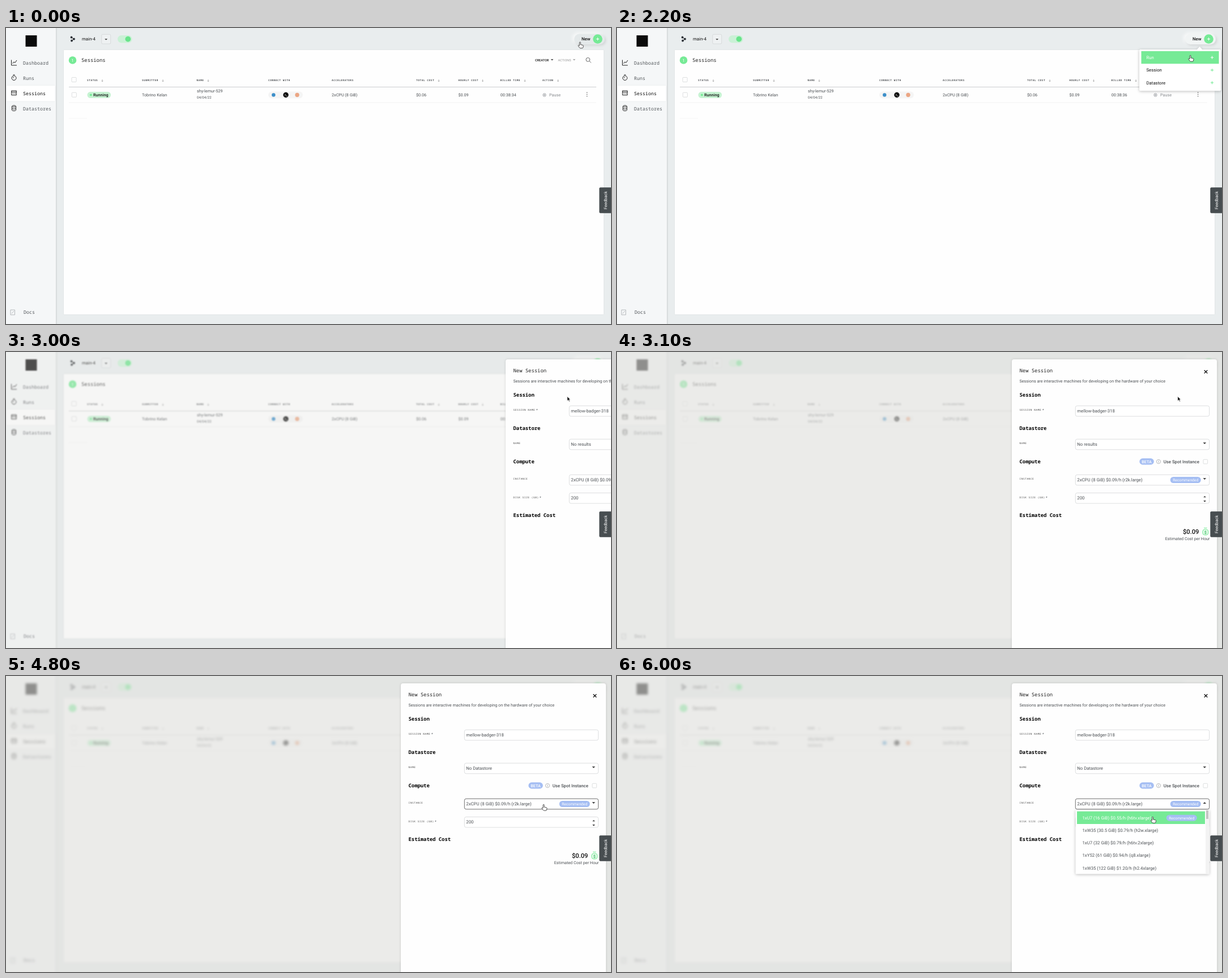
Write an HTML page that moves like this. It is 1068 px wide and 524 px high and loops after 8 s.

```html
<!DOCTYPE html>
<html lang="en">
<head>
<meta charset="utf-8">
<title>New session</title>
<style>
  html, body { margin: 0; width: 100%; height: 100%; overflow: hidden; background: #e9edee; }
  svg { display: block; width: 100%; height: 100%; }
  text { font: 7.23px Roboto, sans-serif; fill: #4c5054; white-space: pre; text-rendering: geometricPrecision; }
  .mono { font: 8.9px "Noto Sans Mono", monospace; fill: #222; }
  .nav { font-size: 8.34px; fill: #54585c; }
  .head { font: 700 4.45px "Noto Sans Mono", monospace; letter-spacing: .56px; fill: #4c4f53; }
  .label { font: 4.45px "Noto Sans Mono", monospace; letter-spacing: .56px; fill: #444; }
  .b { font-weight: 700; fill: #000; }
  .m { font-weight: 500; }
  .f14 { font-size: 7.79px; }
  .small { font-size: 6.1px; }
  .badge { font-size: 6.68px; fill: #fff; }
  .white { fill: #fff; }
  .black { fill: #111; }
  .line { fill: none; stroke: #222; stroke-width: 1; }
  .grey { stroke: #a5a9ac; }
  .box { fill: #fff; stroke: #cfd1d3; stroke-width: .7; }
  .shadow { filter: drop-shadow(0 1px 2.5px #0004); }
  #pill { filter: drop-shadow(2px 2px 2px #0000001c) drop-shadow(-3px -2px 3px #ffffffc0); }
</style>
</head>
<body>
<svg id="stage" viewBox="0 0 1068 524" preserveAspectRatio="none"></svg>
<script>
const GREEN = '#76ea96';
const text = (x, y, s, cls = '', more = '') => `<text x="${x}" y="${y}" class="${cls}" ${more}>${s}</text>`;
const rect = (x, y, w, h, fill, r = 0, more = '') =>
  `<rect x="${x}" y="${y}" width="${w}" height="${h}" rx="${r}" ${fill ? `fill="${fill}"` : ''} ${more}/>`;
const box = (x, y, w, h, r = 1, more = '') => rect(x, y, w, h, '', r, `class="box" ${more}`);
const dot = (x, y, r, fill, more = '') => `<circle cx="${x}" cy="${y}" r="${r}" fill="${fill}" ${more}/>`;
const path = (d, cls = 'line', more = '') => `<path d="${d}" class="${cls}" ${more}/>`;
const caret = (x, y, dir = 1, fill = '#333', w = 2.8) =>
  path(`M${x - w} ${y}h${2 * w}l${-w} ${w * dir}z`, '', `fill="${fill}"`);
const plus = (x, y, color) => path(`M${x - 2.6} ${y}h5.2m-2.6-2.6v5.2`, 'line', `style="stroke:${color}"`);
const group = (id, body, more = '') => `<g id="${id}" ${more}>${body}</g>`;
const recommended = (x, y) => rect(x, y, 54, 11, '#a5bef3', 5.5) + text(x + 27, y + 7.9, 'Recommended', 'badge', 'text-anchor="middle"');

function sidebar() {
  const icons = [
    'M9.5 56.5v9.5h9.5M11.5 63l2.5-3 2 1.5 3-4.5',
    'M14 84.5a4 4 0 1 0 .1 0M12.5 82.8h3M14 88.5l-2-1.5',
    'M9.7 111h8.6v7.8h-8.6zM9.7 113.4h8.6M11.5 116h2M15 116h2',
    'M10.5 138.5a3.5 1.4 0 1 0 7 0a3.5 1.4 0 1 0-7 0v6.8a3.5 1.4 0 0 0 7 0v-6.8M10.5 142a3.5 1.4 0 0 0 7 0'
  ];
  return rect(-20, -20, 108, 564, '#f5f7f8', 0, 'style="filter:drop-shadow(1px 0 1px #0002)"') +
    rect(34.5, 13, 20, 20, '#0b0b0b') +
    rect(1, 102, 85.5, 27.5, '#fff', 1, 'style="filter:drop-shadow(0 0 1px #0001)"') +
    ['Dashboard', 'Runs', 'Sessions', 'Datastores'].map((s, i) =>
      text(30, 65.2 + i * 26.8, s, 'mono nav', i === 2 ? 'style="fill:#111"' : '') + path(icons[i])).join('') +
    path('M8 499h7.5v8.8h-7.5zM10 505.500l4-4.500', 'line grey', 'style="stroke-width:.8"') +
    text(31, 506.4, 'Docs', 'mono nav');
}

function table() {
  const heads = [[143, 'STATUS', 170], [240, 'SUBMITTER', 277], [336.5, 'NAME', 357], [463, 'CONNECT WITH'],
    [575, 'ACCELERATORS'], [724, 'TOTAL COST', 764], [798.5, 'HOURLY COST', 841.5], [872.5, 'BILLED TIME', 916],
    [947, 'ACTION', 974.5]];
  const arrow = x => path(`M${x} 91.200v3.600m-1.200-1.200l1.200 1.200l1.200-1.200`, 'line', 'style="stroke:#777;stroke-width:.6"');
  return rect(102, 39, 953, 468, '#fefefe', 1, 'style="filter:drop-shadow(0 0 1px #0001)"') +
    dot(117.5, 57, 6.8, GREEN) + text(117.5, 59.6, '1', 'white', 'text-anchor="middle"') +
    text(133, 60.2, 'Sessions', 'mono') +
    text(934, 58.5, 'CREATOR', 'black m', 'style="font-size:5.56px"') + caret(964, 55.3, 1, '#333', 2.3) +
    text(974.5, 58.5, 'ACTIONS', '', 'style="font-size:5.56px;fill:#999"') + caret(1003, 55.3, 1, '#999', 2.3) +
    path('M1030.7 56a3.400 3.400 0 1 0-6.800 0a3.400 3.400 0 1 0 6.800 0M1029.800 58.500l3 3', 'line', 'style="stroke:#555;stroke-width:.9"') +
    box(116, 87.5, 8, 8) + box(116.3, 114.3, 8, 8) +
    heads.map(([x, s, a]) => text(x, 93.7, s, 'head') + (a ? arrow(a) : '')).join('') +
    rect(111, 104, 931, .8, '#bfc1c3') + rect(111, 131.7, 931, .7, '#ececec') + rect(111, 159.7, 32, .7, '#efefef') +
    rect(143.5, 113, 41.5, 11, '#c6f3d2', 5.5) + dot(149.8, 118.6, 2, GREEN) + text(154, 121.2, 'Running', 'black m') +
    text(240, 120.7, 'Tobrino Kelan') + text(337, 114, 'shy-lemur-529') + text(337, 124.7, '04/04/22', 'small') +
    rect(463, 112.5, 61, 12, '#f5f5f5', 6) + dot(472.3, 118.5, 3.2, '#3d8fc9') +
    dot(494, 118.5, 4.7, '#0c0c0c') + path('M492 116.800l1.700 1.500l-1.700 1.500M494.300 120.300h2', 'line', 'style="stroke:#fff;stroke-width:.7"') +
    dot(514, 118.5, 3.7, '#eba684') +
    text(575, 120.7, '2xCPU (8 GiB)') + text(724, 120.7, '$0.06') + text(798.5, 120.7, '$0.09') +
    text(872.8, 120.7, '', '', 'id="timer"') +
    dot(950.5, 118.6, 2.7, 'none', 'stroke="#8a8d92" stroke-width=".8"') + rect(949.5, 117.6, 2, 2, '#8a8d92') +
    text(959, 121.2, 'Pause', '', 'style="fill:#85888c"') +
    [114.3, 117.5, 120.7].map(y => dot(1025.6, y, .8, '#555')).join('');
}

function topbar() {
  return [[115.5, 16.5], [116, 22.5], [120, 19.5]].map(([x, y]) => dot(x, y, 1.9, '#30363d')).join('') +
    path('M115.500 16.500L120 19.500L116 22.500') +
    text(134, 22.3, 'main-4', 'f14 black') +
    box(168.7, 11.3, 16, 16.7, 2, 'style="fill:#eef1f2"') + caret(176.6, 19, 1, '#444', 2.5) +
    rect(197, 13, 25.5, 13.3, '#caf1d6', 6.6) + dot(215.3, 19.6, 4.9, '#69e48b') +
    rect(1003, 10.5, 54, 18.5, '', 9.2, 'id="pill"') +
    text(1016, 22.3, 'New', 'black m', 'style="font-size:7.79px"') +
    dot(1044.5, 19.5, 8.3, GREEN) + plus(1044.5, 19.5, '#fff');
}

const menu = () => group('menu',
  `<g class="shadow">${path('M1023 39l5.500-6l5.500 6z', '', 'fill="#fff"')}${rect(922, 38, 144, 73.3, '#fff', 2)}</g>` +
  ['Run', 'Session', 'Datastore'].map((s, i) => {
    const y = 41 + 22.3 * i;
    return `<g class="item">${rect(925.5, y, 137, 22.3, GREEN)}${text(934.5, y + 14, s, 'f14')}` +
      path(`M1047.900 ${y + 11.2}h5.200m-2.600-2.600v5.200`, 'line') + '</g>';
  }).join(''));

function drawer() {
  const fields = [['mellow-badger-318', 95.3], ['', 154.3], ['2xCPU (8 GiB) $0.09/h (r2k.large)', 217.3], ['200', 249.5]];
  const titles = [['New Session', 36.2], ['Session', 78.6], ['Datastore', 137.6], ['Compute', 196.7], ['Estimated Cost', 291.9]];
  const labels = [['SESSION NAME', 104], ['NAME', 162.8], ['INSTANCE', 225.7], ['DISK SIZE (GB)', 258.6]];
  const options = ['1xU7 (16 GiB) $0.55/h (h6tv.xlarge)', '1xW35 (30.5 GiB) $0.79/h (h2w.xlarge)',
    '1xU7 (32 GiB) $0.79/h (h6tv.2xlarge)', '1xY52 (61 GiB) $0.94/h (q8.xlarge)', '1xW35 (122 GiB) $1.20/h (h2.4xlarge)'];
  return group('drawer',
    rect(697, 13, 362, 530, '#fefefe', 4, 'style="filter:drop-shadow(0 0 2px #0002)"') +
    titles.map(([s, y], i) => text(710.5, y, s, i ? 'mono b' : 'mono')).join('') +
    text(710.5, 53.6, 'Sessions are interactive machines for developing on the hardware of your choice') +
    path('M1036.700 32.200l5.600 5.600m0-5.600l-5.600 5.600', 'line', 'style="stroke:#111;stroke-width:1.3"') +
    labels.map(([s, y]) => text(710.5, y, s, 'label')).join('') +
    text(751, 105, '*', 'small') + text(757, 259.5, '*', 'small') +
    fields.map(([s, y], i) => box(809.3, y, 236.3, 18.5, 3, `id="field${i}"`) +
      text(812.3, y + 11.6, s, 'f14', `id="value${i}"`)).join('') +
    caret(1037.3, 160.3) + group('down', caret(1037.3, 223.3)) + group('up', caret(1037.3, 226, -1)) +
    caret(1037.5, 257.3, -1, '#333', 2.4) + caret(1037.5, 263, 1, '#333', 2.4) +
    recommended(976.7, 221) +
    rect(922.3, 188.3, 25.5, 11.2, '#a5bef3', 5.6) + text(935, 196.5, 'BETA', 'white m', 'text-anchor="middle"') +
    dot(956, 194, 3.6, 'none', 'stroke="#9a9da0" stroke-width=".7"') + rect(955.6, 193.3, .8, 2.6, '#9a9da0') + dot(956, 192.2, .5, '#9a9da0') +
    text(964.7, 196.6, 'Use Spot Instance', 'f14 m') + box(1035, 190.3, 7.6, 7.6) +
    text(999, 321.6, '$0.09', 'black m', 'style="font-size:11.12px"') +
    rect(1033.8, 314, 10, 10, '#e4fbea', 4, `stroke="${GREEN}"`) + path('M1036 311.600h5.600', 'line', `style="stroke:${GREEN}"`) +
    text(1038.8, 321.5, '$', 'm', 'text-anchor="middle" style="fill:#35b95d"') +
    text(967.7, 332.8, 'Estimated Cost per Hour') +
    group('list',
      rect(809.5, 237, 236, 113.5, '#fff', 1, 'class="shadow"') +
      rect(1039, 237, 6.5, 113.5, '#f3f3f3') + rect(1040, 238, 4, 15, '#c4c4c4') +
      rect(812, 239.6, 226, 22.4, GREEN, 0, 'id="hot"') +
      options.map((s, i) => text(821.5, 253.6 + 22.25 * i, s, 'f14', `id="option${i}"`)).join('') +
      recommended(969.7, 245.7)));
}

const hand = 'M-1.200 .8c0-1.200 2-1.200 2 0v3.700l4 .9q1 .3.9 1.400l-.7 3q-.2.900-1 .9h-3.800q-.6 0-1-.6l-2.500-3.300q-.4-.8.4-1.200.8-.2 1.700.8z';
const arrow = 'M0 0v8.200l1.900-1.700 1.400 3 1.500-.7-1.400-2.900h2.500z';

stage.innerHTML =
  group('app', rect(-20, -20, 1108, 564, '#e9edee') + topbar() + table() + sidebar() + menu()) +
  rect(0, 0, 1068, 524, '#e1e1de', 0, 'id="veil"') + drawer() +
  rect(1047.3, 282.3, 24, 45.4, '#474d50', 2) +
  text(0, 0, 'Feedback', 'white', 'text-anchor="middle" transform="translate(1060.700 305) rotate(-90)" style="font-size:7.400px"') +
  path('', '', 'id="cursor" stroke="#fff" stroke-width=".8"');

const el = id => document.getElementById(id);
const show = (id, on) => el(id).style.display = on ? '' : 'none';
const items = [...document.querySelectorAll('.item')];

// Pointer tip: time, x, y
const track = [[0, 1013.5, 25], [100, 1038.5, 19], [200, 1038.5, 19], [300, 1039, 18], [400, 1040, 16.8], [500, 1039.7, 18.5],
  [1900, 1039.7, 18.5], [2000, 1036, 25], [2200, 1012.3, 48.5], [2400, 994, 74], [2500, 990.7, 78.5], [3000, 990.7, 78.5],
  [3100, 989.7, 78.5], [3600, 989.7, 78.5], [3800, 985, 96], [4200, 962, 190], [4400, 951, 223], [4500, 949.3, 227.5],
  [5500, 949.3, 227.5], [5600, 949, 234], [5700, 948, 246], [5800, 947.5, 250.3], [5900, 947.5, 250.3], [6000, 945.8, 249.5], [8000, 945.8, 249.5]];

function pointer(t) {
  const i = track.findIndex(k => k[0] > t);
  const [a, b] = [track[i - 1], track[i]];
  const p = (t - a[0]) / (b[0] - a[0]);
  return [a[1] + (b[1] - a[1]) * p, a[2] + (b[2] - a[2]) * p];
}

function draw(t) {
  const [x, y] = pointer(t);
  const open = t >= 3000;
  const inside = (a, b) => y >= a && y < b;

  const isHand = open ? inside(154, 173) || inside(217, 270) : t < 2900 && !inside(30, 36);
  const cursor = el('cursor');
  cursor.setAttribute('d', isHand ? hand : arrow);
  cursor.setAttribute('fill', isHand ? '#fff' : '#111');
  cursor.setAttribute('stroke', isHand ? '#222' : '#fff');
  cursor.setAttribute('transform', `translate(${x} ${y})`);

  const tick = t < 400 ? 34 : t < 1500 ? 35 : 36 + Math.floor((t - 1400) / 1000);
  el('timer').textContent = '00:38:' + tick;
  el('pill').setAttribute('fill', !open && y < 30 ? '#e4e9ea' : '#f1f4f4');

  show('menu', t >= 1400 && t < 3100);
  const part = t < 1500;
  el('menu').setAttribute('opacity', part ? .38 : open ? .4 : 1);
  el('menu').setAttribute('transform', part ? 'translate(1026 38) scale(.854) translate(-1026 -38)' : '');
  items.forEach((item, i) => {
    const top = 41 + 22.3 * i;
    const on = t < 2900 && inside(top, top + 22.3);
    item.children[0].style.display = on ? '' : 'none';
    item.children[1].style.fill = on ? '#fff' : '#111';
    item.children[2].style.stroke = on ? '#fff' : GREEN;
  });

  const slide = t < 3100 ? .5 : 1;
  show('veil', open);
  show('drawer', open);
  el('veil').setAttribute('opacity', .62 * slide);
  el('drawer').setAttribute('transform', `translate(${370 * (1 - slide)} 0)`);
  el('app').style.filter = open ? `blur(${t < 3100 ? .8 : t < 3200 ? 1.5 : 2.1}px)` : '';

  el('value1').textContent = t < 4000 ? 'No results' : 'No Datastore';
  el('field2').style.stroke = t >= 4800 ? '#333' : '';
  const listed = t >= 5000;
  show('list', listed);
  show('up', listed);
  show('down', !listed);
  el('list').setAttribute('opacity', t < 5100 ? .5 : 1);
  el('list').setAttribute('transform', t < 5100 ? 'translate(0 237) scale(1 .85) translate(0 -237)' : '');
  const hot = listed && y > 239.6;
  show('hot', hot);
  el('option0').style.fill = hot ? '#fff' : '';
}

const start = performance.now();
function loop() {
  // The screen refreshes in steps of 100 ms
  draw(Math.floor((performance.now() - start) % 8000 / 100) * 100);
  requestAnimationFrame(loop);
}
loop();
</script>
</body>
</html>
```
